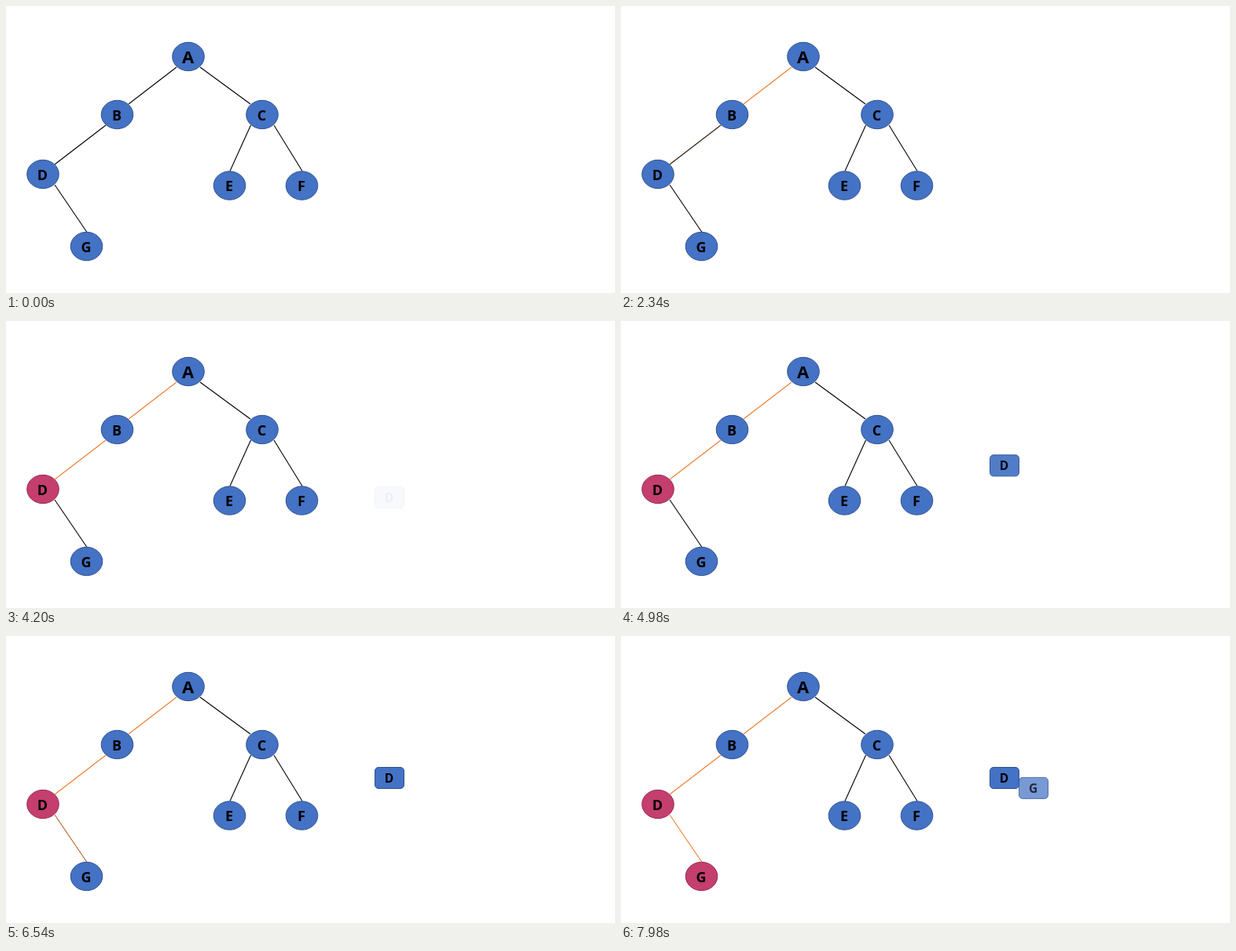
Recreate the animation shown at these times as an HTML page with a canvas. Size 775 by 366 pixels, loop 8000 ms.

```html
<!DOCTYPE html>
<html lang="en">
<head>
<meta charset="utf-8">
<title>Tree traversal</title>
<style>
  html, body { margin: 0; width: 100%; height: 100%; overflow: hidden; background: #fff; }
  canvas { display: block; }
</style>
</head>
<body>
<canvas id="stage" width="775" height="366"></canvas>
<script>
const ctx = document.getElementById('stage').getContext('2d');
const LOOP = 8000;
const FONT = '"Noto Sans", "Open Sans", sans-serif';

const BLACK = [0, 0, 0];
const ORANGE = [237, 125, 49];
const BLUE = [68, 114, 196];
const BLUE_EDGE = [47, 82, 143];
const PINK = [196, 62, 110];
const PINK_EDGE = [150, 44, 88];

// start and duration turn an edge orange or a node pink
const edges = [
  { from: [217, 78], to: [156, 125], start: 0, time: 1640 },
  { from: [247, 78], to: [311, 125] },
  { from: [127, 152], to: [62, 202], start: 2000, time: 1640 },
  { from: [311.5, 152], to: [285, 210.5] },
  { from: [341, 152], to: [377, 210.5] },
  { from: [62, 228], to: [103, 288.5], start: 5280, time: 1640 }
];

const nodes = [
  { name: 'A', x: 232, y: 64.5, size: 22, weight: 600 },
  { name: 'B', x: 141.5, y: 138.5 },
  { name: 'C', x: 326, y: 138.5 },
  { name: 'D', x: 47, y: 214.5, start: 3640, time: 540 },
  { name: 'E', x: 284.5, y: 229 },
  { name: 'F', x: 376.5, y: 229 },
  { name: 'G', x: 102.5, y: 306.5, start: 6920, time: 540 }
];

const boxes = [
  { name: 'D', x: 469.5, start: 4178, time: 1100 },
  { name: 'G', x: 506.5, start: 7463, time: 1100 }
];

const progress = (item, t) =>
  item.time ? Math.min(1, Math.max(0, (t - item.start) / item.time)) : 0;

const easeOut = p => 1 - (1 - p) ** 2;

const mix = (a, b, p) =>
  `rgb(${a.map((v, i) => Math.round(v + (b[i] - v) * p)).join(',')})`;

function label(text, x, y, size, weight) {
  ctx.font = `${weight} ${size}px ${FONT}`;
  ctx.textAlign = 'center';
  ctx.fillStyle = '#000';
  ctx.fillText(text, x, y + size * 0.357);
}

function drawEdge(edge, t) {
  ctx.strokeStyle = mix(BLACK, ORANGE, progress(edge, t));
  ctx.lineWidth = 1.1;
  ctx.beginPath();
  ctx.moveTo(...edge.from);
  ctx.lineTo(...edge.to);
  ctx.stroke();
}

function drawNode(node, t) {
  const p = progress(node, t);
  ctx.fillStyle = mix(BLUE, PINK, p);
  ctx.strokeStyle = mix(BLUE_EDGE, PINK_EDGE, p);
  ctx.lineWidth = 1;
  ctx.beginPath();
  ctx.ellipse(node.x, node.y, 20.3, 18.2, 0, 0, Math.PI * 2);
  ctx.fill();
  ctx.stroke();
  label(node.name, node.x - 0.5, node.y + 0.8, node.size || 18, node.weight || 700);
}

// boxes rise into place while fading in
function drawBox(box, t) {
  const p = easeOut(progress(box, t));
  if (p === 0) return;
  const y = 167.5 + 46 * (1 - p);
  ctx.globalAlpha = p;
  ctx.fillStyle = mix(BLUE, BLUE, 0);
  ctx.strokeStyle = mix(BLUE_EDGE, BLUE_EDGE, 0);
  ctx.lineWidth = 1;
  ctx.beginPath();
  ctx.roundRect(box.x, y, 37, 27, 4.5);
  ctx.fill();
  ctx.stroke();
  label(box.name, box.x + 18, y + 14, 15.5, 600);
  ctx.globalAlpha = 1;
}

function draw(t) {
  ctx.fillStyle = '#fff';
  ctx.fillRect(0, 0, 775, 366);
  edges.forEach(e => drawEdge(e, t));
  nodes.forEach(n => drawNode(n, t));
  boxes.forEach(b => drawBox(b, t));
}

const begin = performance.now();
function tick() {
  draw((performance.now() - begin) % LOOP);
  requestAnimationFrame(tick);
}
tick();
</script>
</body>
</html>
```
